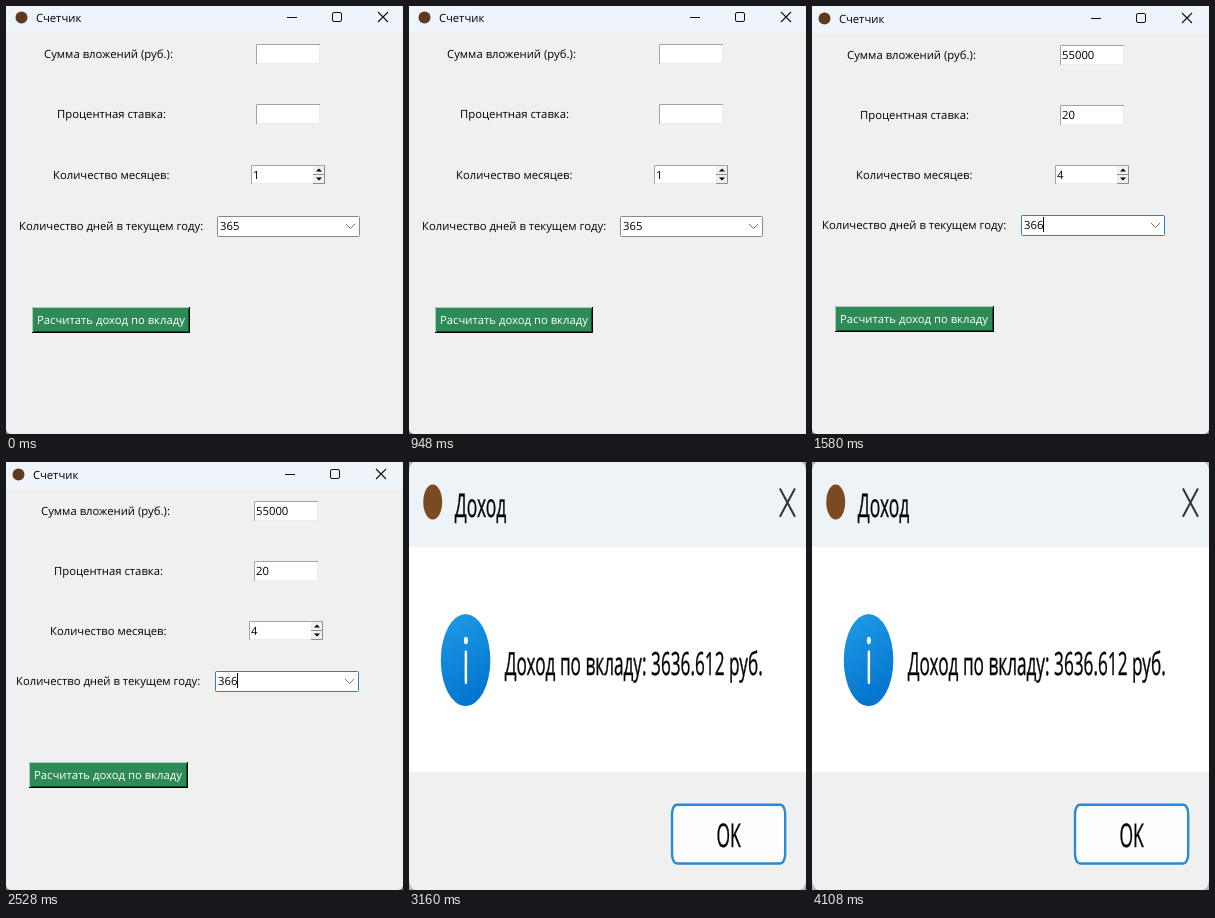
An HTML page that plays this animation: 397 by 428 pixels, repeating every 4740 ms.

```html
<!DOCTYPE html>
<html lang="ru">
<head>
<meta charset="utf-8">
<style>
  html, body { margin: 0; width: 100%; height: 100%; overflow: hidden; }
  svg { display: block; width: 397px; height: 428px; }
  text {
    font: 11.3px "Open Sans", "Noto Sans", sans-serif; fill: #000; white-space: pre;
    text-rendering: geometricPrecision;
  }
</style>
</head>
<body>
<svg id="stage" viewBox="0 0 397 428">
  <defs>
    <linearGradient id="blue" x2="0.3" y2="1">
      <stop stop-color="#1f9ce6"/><stop offset="1" stop-color="#0476d0"/>
    </linearGradient>
  </defs>
</svg>
<script>
const SCENE_MS = 1580;
const stage = document.getElementById('stage');

const text = (x, y, s, extra = '') => `<text x="${x}" y="${y}" ${extra}>${s}</text>`;
const rect = (x, y, w, h, fill, extra = '') =>
  `<rect x="${x}" y="${y}" width="${w}" height="${h}" fill="${fill}" ${extra}/>`;
const line = (d, color = '#111', width = 1, extra = '') =>
  `<path d="${d}" fill="none" stroke="${color}" stroke-width="${width}" ${extra}/>`;
const field = (x, y, w, h) => rect(x, y, w, h, '#fff') +
  line(`M${x + .5} ${y + h}V${y + .5}H${x + w}`, '#a4a4a4') +
  line(`M${x + w - .5} ${y + 1}V${y + h - .5}H${x + 1}`, '#ececec');

function titleControls(x, y) {
  return line(`M${x} ${y + .5}h10`) +
    rect(x + 45.5, y - 4.5, 9, 9, 'none', 'rx="1.5" stroke="#111"') +
    line(`M${x + 91} ${y - 5}l10 10m0 -10l-10 10`, '#111', 1.1);
}

function spinner(x, y) {
  const button = (top, arrow) => rect(x + 62, top, 12, 8, '#f0f0f0') +
    line(`M${x + 62} ${top + 8.5}h11.5v-8.5`, '#8c8c8c') +
    `<path d="M${x + 65} ${top + 4 - arrow * 1.5}h6l-3 ${arrow * 3}z" fill="#000"/>`;
  return field(x, y, 74, 19) + button(y + 1, -1) + button(y + 10, 1);
}

function greenButton(x, y, w, h) {
  return rect(x, y, w, h, '#2e8b57') +
    line(`M${x + .5} ${y + h}V${y + .5}H${x + w}`, '#a5cfb7') +
    line(`M${x + 2} ${y + h - 1.5}H${x + w - 1.5}V${y + 2}`, '#17462c') +
    line(`M${x} ${y + h - .5}H${x + w - .5}V${y}`, '#000') +
    text(x + 5, y + 17, 'Расчитать доход по вкладу', 'style="fill:#fff"');
}

function form({ dx, dy, width, controlsX, entryX, comboX, comboW, buttonW, border, values, caret }) {
  const [sum, rate, months, days] = values;
  const low = 0 - dy;
  return rect(0, 0, 397, 428, '#777') +
    rect(0, -10, width, 438, '#f0f0f0', 'rx="5"') +
    rect(0, 0, 397, 26 + dy, '#eef4f9') +
    `<circle cx="${15.5 + dx}" cy="${11.5 + dy}" r="6" fill="#5f3a1d"/>` +
    text(30 + dx, 16 + dy, 'Счетчик') + titleControls(controlsX, 11 + dy) +
    text(38 + dx, 52 + dy / 2, 'Сумма вложений (руб.):') +
    text(51 + dx, 112 + dy / 2, 'Процентная ставка:') +
    text(47 + dx, 173, 'Количество месяцев:') +
    text(13 + dx, 224 + low, 'Количество дней в текущем году:') +
    field(entryX, 38 + dy, 64, 20) + text(entryX + 2, 52 + dy, sum) +
    field(entryX, 98 + dy, 64, 20) + text(entryX + 2, 112 + dy, rate) +
    spinner(entryX - 5, 159) + text(entryX - 3, 173, months) +
    rect(comboX + .5, 210.5 + low, comboW, 20, '#fff', `rx="1" stroke="${border}"`) +
    text(comboX + 3, 224 + low, days) +
    line(`M${comboX + comboW - 13} ${218 + low}l4.5 4.5l4.5 -4.5`, '#777') +
    (caret ? line(`M${comboX + 22.5} ${212 + low}v15`, '#000') : '') +
    greenButton(26 + dx, 301 + low, buttonW, 26);
}

// A small message box enlarged to cover the stage.
function dialog() {
  const thin = 'vector-effect="non-scaling-stroke"';
  const heavy = 'stroke="#222" stroke-width=".18"';
  return rect(0, 0, 397, 428, '#b4b4b4') + '<g transform="scale(1.55 2.88)">' +
    rect(0, 0, 256.2, 148.6, '#f0f0f0', 'rx="4"') +
    rect(0, 0, 256.2, 40, '#eef3f8', 'rx="4"') +
    rect(0, 29.6, 256.2, 78, '#fff') +
    '<circle cx="15.3" cy="13.9" r="6.1" fill="#7a4a22"/>' +
    text(29.5, 19.1, 'Доход', heavy) +
    line('M239.3 9.2l9.7 9.8m0 -9.8l-9.7 9.8', '#333', 2, thin) +
    '<circle cx="36.5" cy="68.8" r="16" fill="url(#blue)"/>' +
    '<circle cx="36.7" cy="62" r="1.3" fill="#fff"/>' +
    rect(35.9, 65.4, 1.6, 11.8, '#fff', 'rx=".8"') +
    text(61.8, 73.8, 'Доход по вкладу: 3636.612 руб.', `${heavy} style="font-size:11.1px"`) +
    rect(169.7, 119, 73, 20.4, '#fdfdfd', `rx="3.2" stroke="#2a8ad2" stroke-width="2.4" ${thin}`) +
    text(206.2, 133.6, 'OK', `${heavy} text-anchor="middle"`) + '</g>';
}

const scenes = [
  form({ dx: 0, dy: 0, width: 410, controlsX: 281, entryX: 250, comboX: 211, comboW: 142,
    buttonW: 158, border: '#8a8a8a', values: ['', '', '1', '365'] }),
  form({ dx: -3, dy: 1, width: 397, controlsX: 279, entryX: 248, comboX: 209, comboW: 143,
    buttonW: 159, border: '#2f7fb5', values: ['55000', '20', '4', '366'], caret: true }),
  dialog()
].map(markup => {
  const group = document.createElementNS('http://www.w3.org/2000/svg', 'g');
  group.innerHTML = markup;
  return stage.appendChild(group);
});

function draw() {
  const current = Math.floor(performance.now() / SCENE_MS) % scenes.length;
  scenes.forEach((scene, i) => scene.style.display = i === current ? '' : 'none');
  requestAnimationFrame(draw);
}
draw();
</script>
</body>
</html>
```
